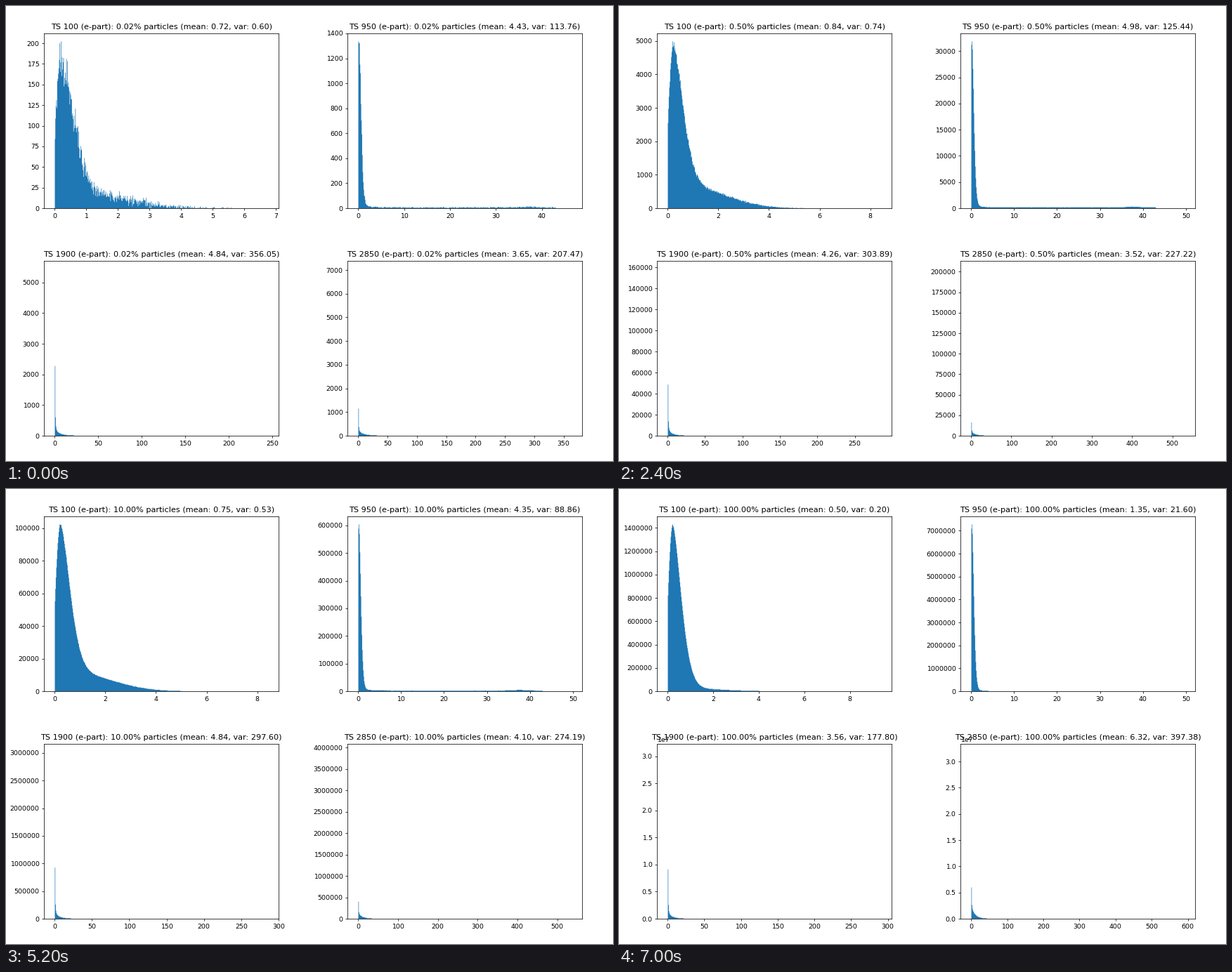
A matplotlib script for the animation above (7400 ms loop, 864 px wide and 648 px high).

```python
import numpy as np
import matplotlib.pyplot as plt
from matplotlib.animation import FuncAnimation

plt.rcParams["font.family"] = "DejaVu Sans"
plt.rcParams["axes.formatter.limits"] = (-7, 7)

W, H, DPI = 864, 648, 67.5
AX_W, AX_H = 334.3, 249.2
BLUE = "#1f77b4"
GRAIN = 0.675                       # width of one bar column in pixels
COLS = int(AX_W / 1.1 / GRAIN)

# Share of particles: 0.02..0.09, 0.1..0.9, 1..9, 10..100 percent
PCT = np.array([d * 10.0 ** e for e in (-2, -1, 0, 1) for d in range(1, 10)][1:] + [100.0])
KEY_PCT = [.02, .05, .1, .9, 6, 40, 100]


def core(x, width, dip):
    """Thermal peak at 0.22, reduced by dip at zero energy."""
    rise = 1 - dip * np.clip((.22 - x) / .22, 0, 1) ** 1.8
    return rise * np.exp(-(np.clip(x - .22, 0, None) / width) ** 1.65)


def thermal(x, mean):
    tail = .02 + .155 * (mean - .5) / .35
    return core(x, .53, .5) + tail * (1 - np.exp(-x / .3)) * np.exp(-(x / 2.7) ** 2.4)


def beam(x, mean):
    level = .0055 * (mean - 1.3) / 4
    plateau = (1 + .8 * np.exp(-((x - 37.5) / 2) ** 2)) * ((x > 1) & (x < 43))
    return core(x, .62, .1) + .03 * np.exp(-x / 1.3) + level * plateau


def steep(x, decay):
    return .1 * x ** -2.2 + .03 * np.exp(-x / decay)


def late(x, mean):
    return steep(x, 7)


def latest(x, mean):
    return (mean / 4) ** 1.8 * steep(x, 11)


class Panel:
    """One histogram; mean, var and rate are given at KEY_PCT.

    rate is the highest count in thousands per percent of particles,
    reach maps a step to the highest energy from that step on.
    """

    def __init__(self, ts, left, bottom, shape, grainy, mean, var, rate, reach):
        self.ts, self.left, self.shape = ts, left, shape
        self.mean, self.var, self.rate, self.reach = mean, var, rate, reach
        self.noise = np.random.default_rng(ts).standard_normal(COLS) if grainy else None
        self.ax = fig.add_axes([left / W, bottom / H, AX_W / W, AX_H / H])
        self.bars = self.ax.stairs(np.zeros(COLS), np.arange(COLS + 1), fill=True, color=BLUE)
        self.bars.set_snap(False)
        # A fixed height keeps the title in place over the exponent label
        self.title = self.ax.set_title("", y=1.0)

    def heights(self, x, mean, peak):
        h = self.shape(x, mean)
        if self.noise is None:
            return h * peak
        lam = h / h.max() * (peak - 2.2 * np.sqrt(peak))
        counts = np.clip(np.round(lam + self.noise * np.sqrt(lam)), 0, None)
        return counts * peak / counts.max()

    def show(self, step):
        pct = PCT[step]
        mean, var, rate = (np.interp(np.log(pct), np.log(KEY_PCT), v)
                           for v in (self.mean, self.var, self.rate))
        peak = 1000 * rate * pct
        xmax = self.reach[max(s for s in self.reach if s <= step)]

        # Columns lie on a fixed grid, the first one just right of zero
        scale = AX_W / (1.1 * xmax)
        origin = self.left + .05 * xmax * scale
        first = np.ceil(origin / GRAIN)
        edges = ((first + np.arange(COLS + 1)) * GRAIN - origin) / scale
        x = (edges[:-1] + edges[1:]) / 2
        unit = 1.05 * peak * GRAIN / AX_H
        h = np.round(self.heights(x, mean, peak) / unit) * unit

        self.bars.set_data(h, edges)
        self.ax.set_xlim(-.05 * xmax, 1.05 * xmax)
        self.ax.set_ylim(0, 1.05 * peak)
        self.title.set_text(f"TS {self.ts} (e-part): {pct:.2f}% particles "
                            f"(mean: {mean:.2f}, var: {var:.2f})")


fig = plt.figure(figsize=(W / DPI, H / DPI), dpi=DPI)
PANELS = [
    Panel(100, 54, 360, thermal, True,
          mean=[.72, .75, .74, .87, .84, .52, .50],
          var=[.60, .65, .63, .78, .65, .22, .20],
          rate=[10.1, 9.24, 10.69, 9.7, 9.31, 12.68, 14.29],
          reach={0: 6.75, 6: 7.76, 12: 8.43, 32: 9.37}),
    Panel(950, 486, 360, beam, True,
          mean=[4.43, 3.80, 3.16, 5.64, 5.37, 1.59, 1.35],
          var=[113.76, 97.16, 79.90, 142.07, 111.17, 28.31, 21.60],
          rate=[66.7, 67.4, 68.5, 61.9, 56.2, 71.43, 72.7],
          reach={0: 46.5, 2: 47.4, 12: 49.7}),
    Panel(1900, 54, 36, late, False,
          mean=[4.84, 3.96, 3.18, 4.66, 5.43, 3.24, 3.56],
          var=[356.05, 286.05, 229.11, 331.20, 345.56, 167.43, 177.80],
          rate=[272, 285, 300, 323, 297, 314, 308],
          reach={0: 245.3, 12: 285.1, 19: 286, 32: 291}),
    Panel(2850, 486, 36, latest, False,
          mean=[3.65, 3.31, 3.08, 3.68, 4.18, 3.90, 6.32],
          var=[207.47, 189.25, 180.35, 244.34, 271.08, 282.62, 397.38],
          rate=[352, 387, 408, 406, 386, 399, 318],
          reach={0: 363.8, 2: 444.6, 6: 530.6, 26: 536.3, 32: 591.4}),
]


def draw(i):
    for panel in PANELS:
        panel.show(min(i, len(PCT) - 1))
    return []


# The last step stays for two ticks
anim = FuncAnimation(fig, draw, frames=len(PCT) + 1, interval=200,
                     init_func=lambda: draw(0), repeat=True, repeat_delay=0)
plt.show()
```
